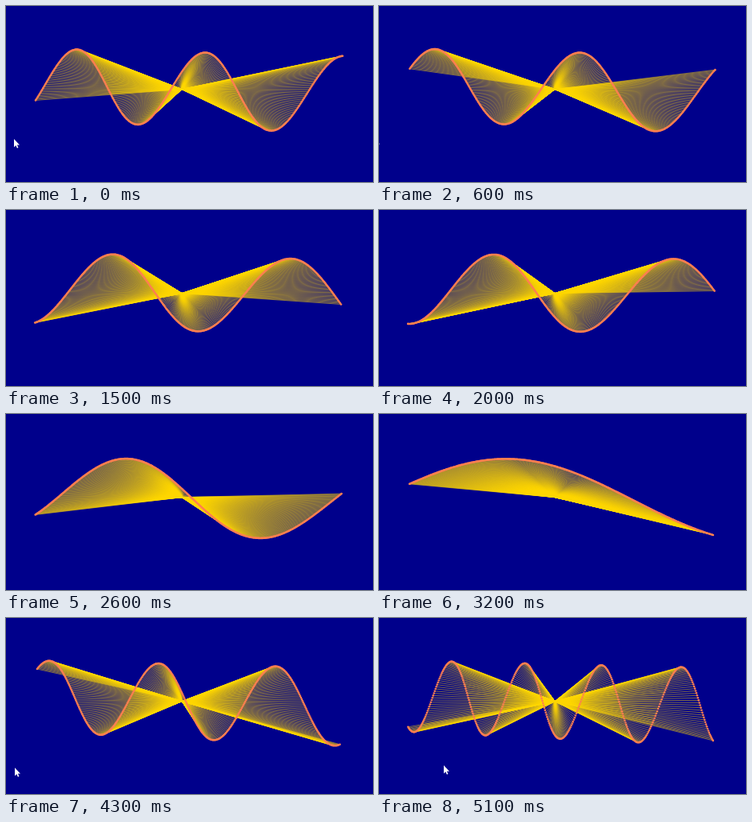
Write an HTML page with a canvas that moves like this. It is 459 px wide and 221 px high and loops after 5.2 s.

```html
<!DOCTYPE html>
<html lang="en">
<head>
<meta charset="utf-8">
<title>Wave fan</title>
<style>
  html, body { margin: 0; width: 100%; height: 100%; overflow: hidden; background: #00008b; }
  canvas { display: block; }
</style>
</head>
<body>
<canvas id="stage" width="459" height="221"></canvas>
<script>
const ctx = document.getElementById('stage').getContext('2d');
const LOOP = 5.2, STEP = 0.1;
const CX = 220, CY = 104.6;      // hub of the fan
const COUNT = 400;
const HALF = 190.5, AMP = 46.8, DEPTH = 0.0446, TILT = 0.0354;
const COS = Math.cos(TILT), SIN = Math.sin(TILT);

// time, number of waves, rate of change
const waveKeys = [
  [0, 2.315, -0.5], [0.6, 2.04, -0.42], [1.5, 1.732, -0.1], [2, 1.722, -0.15],
  [3.2, 0.617, 0], [4.3, 2.656, 1.8], [5.1, 4, 1.6]
];

// time, x, y of the pointer tip
const pointerPaths = [
  [[0, 10, 167], [0.6, -6, 166]],
  [[4, 444, 182], [4.2, 150, 188], [4.3, 11, 188], [5.1, 81, 185]]
];

function segment(keys, t) {
  let i = 0;
  while (i < keys.length - 2 && t >= keys[i + 1][0]) i++;
  const a = keys[i], b = keys[i + 1], span = b[0] - a[0];
  return { a, b, span, s: (t - a[0]) / span };
}

function waves(t) {
  const { a, b, span, s } = segment(waveKeys, t);
  const r = 1 - s;
  return a[1] * r * r * (1 + 2 * s) + b[1] * s * s * (3 - 2 * s)
       + span * s * r * (a[2] * r - b[2] * s);
}

function wavePoints(t) {
  const n = waves(t), phase = -2.04 + 12 * t;
  return Array.from({ length: COUNT }, (_, i) => {
    const f = i / (COUNT - 1), u = 2 * f - 1;
    const zoom = 1 / (1 - DEPTH * u);
    const x = HALF * u * zoom;
    const y = -AMP * zoom * Math.cos(phase + 2 * Math.PI * n * f);
    return [CX + x * COS - y * SIN, CY + x * SIN + y * COS];
  });
}

function drawPointer(t) {
  for (const path of pointerPaths) {
    if (t < path[0][0] - 0.001 || t > path[path.length - 1][0] + 0.001) continue;
    const { a, b, s } = segment(path, t);
    ctx.save();
    ctx.translate(a[1] + (b[1] - a[1]) * s, a[2] + (b[2] - a[2]) * s);
    const arrow = new Path2D('M0 0V10.2L2.3 8L3.9 11.6L5.4 10.9L3.9 7.4H7Z');
    ctx.fillStyle = '#fff';
    ctx.fill(arrow);
    ctx.restore();
  }
}

function draw(t) {
  ctx.fillStyle = '#00008b';
  ctx.fillRect(0, 0, 459, 221);
  const points = wavePoints(t);

  ctx.strokeStyle = '#ffd700';
  ctx.lineWidth = 0.5;
  for (const [x, y] of points) {
    ctx.beginPath();
    ctx.moveTo(CX, CY);
    ctx.lineTo(x, y);
    ctx.stroke();
  }

  ctx.fillStyle = '#ff7f50';
  for (const [x, y] of points) {
    ctx.beginPath();
    ctx.arc(x, y, 1.3, 0, 2 * Math.PI);
    ctx.fill();
  }
  drawPointer(t);
}

const start = performance.now();
function tick() {
  const t = ((performance.now() - start) / 1000) % LOOP;
  draw(Math.floor(t / STEP + 0.001) * STEP);
  requestAnimationFrame(tick);
}
tick();
</script>
</body>
</html>
```
